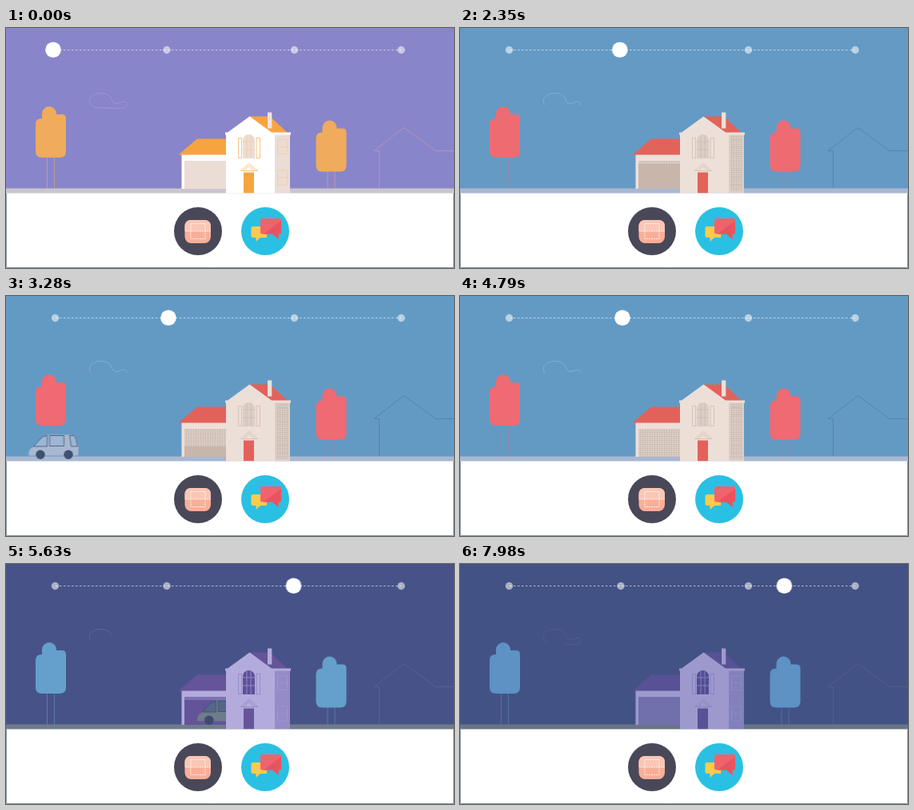
An HTML page for the animation above (8 s loop, 560x300 px).

```html
<!DOCTYPE html>
<html lang="en">
<head>
<meta charset="utf-8">
<title>House through the day</title>
<style>
  @property --sky { syntax: '<color>'; inherits: true; initial-value: #8985ca; }
  @property --tree { syntax: '<color>'; inherits: true; initial-value: #f0ab5c; }
  @property --trunk { syntax: '<color>'; inherits: true; initial-value: #cfa094; }
  @property --ground { syntax: '<color>'; inherits: true; initial-value: #c9c6cf; }
  @property --wall { syntax: '<color>'; inherits: true; initial-value: #fff; }
  @property --side { syntax: '<color>'; inherits: true; initial-value: #ecdcd6; }
  @property --shutter { syntax: '<color>'; inherits: true; initial-value: #ecdcd6; }
  @property --inside { syntax: '<color>'; inherits: true; initial-value: #cdbbb4; }
  @property --roof { syntax: '<color>'; inherits: true; initial-value: #f7a440; }
  @property --chimney { syntax: '<color>'; inherits: true; initial-value: #f0e4e2; }
  @property --glass { syntax: '<color>'; inherits: true; initial-value: #ecdcd6; }
  @property --line { syntax: '<color>'; inherits: true; initial-value: #f1cd9b; }
  @property --trim { syntax: '<color>'; inherits: true; initial-value: #f3b566; }
  @property --far { syntax: '<color>'; inherits: true; initial-value: #bb9bac; }
  @property --cloud { syntax: '<color>'; inherits: true; initial-value: #a09cd8; }
  @property --car { syntax: '<color>'; inherits: true; initial-value: #a9b8d2; }
  @property --pane { syntax: '<color>'; inherits: true; initial-value: #9db6d3; }
  @property --tyre { syntax: '<color>'; inherits: true; initial-value: #3f5170; }

  html, body { margin: 0; width: 100%; height: 100%; overflow: hidden; }
  svg { display: block; width: 560px; height: 300px; animation: theme 8s ease infinite; }

  .sky { fill: var(--sky); }
  .tree { fill: var(--tree); }
  .ground { fill: var(--ground); }
  .wall { fill: var(--wall); }
  .side { fill: var(--side); }
  .shutter { fill: var(--shutter); }
  .inside { fill: var(--inside); }
  .roof { fill: var(--roof); }
  .chimney { fill: var(--chimney); }
  .glass { fill: var(--glass); }
  .body { fill: var(--car); }
  .pane { fill: var(--pane); stroke: var(--tyre); stroke-width: .8; }
  .tyre { fill: var(--tyre); }
  .trunk, .line, .trim, .far, .cloud { fill: none; stroke-width: .8; }
  .trunk { stroke: var(--trunk); }
  .line { stroke: var(--line); }
  .trim { stroke: var(--trim); }
  .far { stroke: var(--far); }
  .cloud { stroke: var(--cloud); animation: cloud 8s ease infinite; }
  .hatch { fill: url(#hatch); animation: hatch 8s ease infinite; }
  .marker { fill: #fff; animation: marker 8s ease infinite; }
  .door { animation: door 8s linear infinite; }
  .drive { animation: drive 8s linear infinite; }
  .kerb { animation: kerb 8s linear infinite; }

  @keyframes theme {
    0%, 24.3% {
      --sky: #8985ca; --tree: #f0ab5c; --trunk: #cfa094; --ground: #c9c6cf;
      --wall: #fff; --side: #ecdcd6; --shutter: #ecdcd6; --inside: #cdbbb4;
      --roof: #f7a440; --chimney: #f0e4e2; --glass: #ecdcd6; --line: #f1cd9b;
      --trim: #f3b566; --far: #bb9bac; --cloud: #a09cd8;
      --car: #a9b8d2; --pane: #9db6d3; --tyre: #3f5170;
    }
    30.6%, 63.4% {
      --sky: #639ac4; --tree: #ef6a72; --trunk: #9488aa; --ground: #a9b8d2;
      --wall: #ecdfd8; --side: #ded1c9; --shutter: #ded1c9; --inside: #c9b6aa;
      --roof: #e2625b; --chimney: #ecdfd8; --glass: #dccdc5; --line: #c9bab1;
      --trim: #d6b9b0; --far: #4b7fab; --cloud: #8ab7d6;
      --car: #a9b8d2; --pane: #9db6d3; --tyre: #3f5170;
    }
    69.7%, 98.3% {
      --sky: #475388; --tree: #64a0cb; --trunk: #5f83b6; --ground: #6e7c8a;
      --wall: #b3abdb; --side: #958bc6; --shutter: #7b73b3; --inside: #63549a;
      --roof: #65549a; --chimney: #b3abdb; --glass: #5f509a; --line: #9f98d0;
      --trim: #8d84c2; --far: #5b6496; --cloud: #626d9e;
      --car: #6d7b8c; --pane: #56688a; --tyre: #3b4a6e;
    }
    99.75%, 100% {
      --sky: #435284; --tree: #5e92c4; --trunk: #5578ae; --ground: #687486;
      --wall: #9e99cd; --side: #8380bb; --shutter: #7270ac; --inside: #5d5496;
      --roof: #585195; --chimney: #9e99cd; --glass: #524d94; --line: #8c8fc8;
      --trim: #7f7ebf; --far: #58638f; --cloud: #56618f;
      --car: #6d7b8c; --pane: #56688a; --tyre: #3b4a6e;
    }
  }
  @keyframes cloud {
    0%, 24.3% { stroke-dasharray: 0 0 100 100; }
    30.6%, 63.4% { stroke-dasharray: 0 6 58 100; }
    69.7%, 98.3% { stroke-dasharray: 0 6 36 100; }
    99.75%, 100% { stroke-dasharray: 0 2 80 100; }
  }
  @keyframes hatch {
    0%, 24.3% { opacity: 0; }
    30.6%, 63.4% { opacity: 1; }
    69.7%, 100% { opacity: 0; }
  }
  @keyframes marker {
    0%, 24.3% { transform: translateX(59px); }
    30.6%, 63.4% { transform: translateX(203px); }
    69.7%, 98.3% { transform: translateX(359.5px); animation-timing-function: linear; }
    99.75% { transform: translateX(405px); animation-timing-function: linear; }
    100% { transform: translateX(412px); }
  }
  @keyframes door {
    0%, 25% { transform: none; }
    30%, 36.75% { transform: translateY(-35px); }
    43.6%, 63.6% { transform: none; }
    68.5% { transform: translateY(-35px); }
    69.9% { transform: translateY(-35px); animation-timing-function: cubic-bezier(.39, .575, .565, 1); }
    77.1%, 100% { transform: none; }
  }
  /* quadratic pull away, quadratic slow down on return */
  @keyframes drive {
    0% { transform: translateX(275px); }
    28.17% { transform: translateX(275px); animation-timing-function: cubic-bezier(.333, 0, .667, .333); }
    43.24% { transform: translateX(-66px); }
    63.63% { transform: translateX(-66px); animation-timing-function: cubic-bezier(.333, .667, .667, 1); }
    73.69%, 100% { transform: translateX(275px); }
  }
  @keyframes kerb {
    0%, 35.3% { transform: none; }
    38%, 65.5% { transform: translateY(3px); }
    68.5%, 100% { transform: none; }
  }
</style>
</head>
<body>
<svg viewBox="0 0 560 300">
  <defs>
    <pattern id="hatch" width="3" height="2.5" patternUnits="userSpaceOnUse">
      <path d="M0 .4H3M.4 0V2.5" fill="none" stroke="#c8b8ae" stroke-width=".7"/>
    </pattern>
    <clipPath id="opening"><rect x="223" y="166.5" width="52" height="34.5"/></clipPath>
    <g id="tree">
      <path class="trunk" d="M51.5 160V210M60.5 160V210"/>
      <path class="tree" d="M37 120q0-7 8-7v-6a9 9 0 0 1 18 0v1h7q5 0 5 5v41q0 8-8 8h-22q-8 0-8-8z"/>
    </g>
    <g id="sideWindow">
      <path class="line" d="M339.5 139.5h12v18h-12zM339.5 148.5h12"/>
    </g>
  </defs>

  <rect class="sky" width="560" height="210"/>

  <!-- timeline -->
  <path d="M62 27.5H494" stroke="#fff" stroke-opacity=".6" stroke-dasharray="2.5 2.5"/>
  <g fill="#fff" fill-opacity=".55">
    <circle cx="61.5" cy="27.5" r="4.7"/>
    <circle cx="201" cy="27.5" r="4.7"/>
    <circle cx="360.5" cy="27.5" r="4.7"/>
    <circle cx="494" cy="27.5" r="4.7"/>
  </g>
  <circle class="marker" cy="27.3" r="9.8"/>

  <!-- backdrop -->
  <path class="cloud" pathLength="100" d="M112 99.5C105 98 103 92 105 88C109 80 126 79 131 87Q133 91 133 92Q137 96 141 94T148 92Q153 94 150 98Q148 100.500 144 100.500L112 99.500"/>
  <path class="far" d="M466.500 201V153.500H460L497.500 124.500L537 153.500H560"/>
  <use href="#tree"/>
  <use href="#tree" x="350.5" y="17.5"/>
  <rect class="ground" y="200.5" width="560" height="7"/>

  <!-- garage -->
  <path class="wall" d="M219.500 157H276V201H219.500z"/>
  <path class="roof" d="M215.500 158.500L239 138.500H276V158.500z"/>
  <rect class="inside" x="223" y="166.5" width="52" height="34.5"/>
  <g clip-path="url(#opening)">
    <g class="door">
      <rect class="shutter" x="223" y="166.5" width="52" height="34.5"/>
      <rect class="hatch" x="223" y="166.5" width="52" height="34.5"/>
    </g>
  </g>

  <!-- car -->
  <g class="drive">
    <g class="kerb">
      <path class="body" d="M1 196Q0 189 6 186L17 174Q20 171 25 170.500H54Q58 170.500 60 174L63 185V194Q63 196.500 60 196.500H3Q1 196.500 1 196z"/>
      <path class="pane" d="M7 185L16 175Q19 172 24 171.500V185zM27 171.500H45V184.500H27zM52 171.500H57Q59 172 60 176L62 185H54z"/>
      <circle class="tyre" cx="15.5" cy="195.300" r="5.700"/>
      <circle class="tyre" cx="50.500" cy="195.300" r="5.700"/>
    </g>
  </g>

  <!-- house -->
  <path class="roof" d="M304 110.500H330L352 131H304z"/>
  <rect class="chimney" x="327" y="105.500" width="5.300" height="20"/>
  <rect class="side" x="335" y="132" width="20" height="74.500"/>
  <rect class="hatch" x="337" y="134" width="17" height="70"/>
  <path class="wall" d="M274 130.500H277L304.500 110.500L332 130.500H356V133.500H336V206.500H275V133.500H274z"/>
  <use href="#sideWindow"/>
  <use href="#sideWindow" y="38.500"/>
  <path class="glass" d="M296 163V140.500a7.500 7.500 0 0 1 15 0V163z"/>
  <path class="line" d="M301 134V163M306 134V163M296 142H311M296 152H311"/>
  <path class="trim" d="M290.500 137.500h4v25h-4zM313 137.500h4.500v25h-4.500z"/>
  <path class="trim" d="M293.500 178.500L304 169.500L314.500 178.500zM297 178.500L304 172.500L311 178.500"/>
  <rect class="roof" x="297" y="180.500" width="13" height="26"/>

  <!-- lower panel -->
  <rect y="206.500" width="560" height="94" fill="#fff"/>
  <path d="M.5 206.500V299.500H559.500V206.500" fill="none" stroke="#8a959f"/>
  <circle cx="240" cy="254" r="30" fill="#484859"/>
  <rect x="223.500" y="240" width="32.500" height="29" rx="8" fill="#f9ae98"/>
  <path d="M223.500 254V248q0-8 8-8h16.500q8 0 8 8V254z" fill="#fac6b5"/>
  <path d="M231 244.500H249V263.500H231zM224 254H256" fill="none" stroke="#fff" stroke-width=".8" stroke-dasharray="2 1"/>
  <circle cx="324" cy="254" r="30" fill="#2ac0e3"/>
  <path d="M308.500 248H326V262H318L312.500 267V262H308.500Q306.500 262 306.500 260V250Q306.500 248 308.500 248z" fill="#fbcb4f"/>
  <path d="M320.500 238H341.500Q344 238 344 240.500V255Q344 257.500 341.500 257.500H340.500V264L333 257.500H320.500Q318 257.500 318 255V240.500Q318 238 320.500 238z" fill="#f0636c"/>
  <path d="M344 241V255Q344 257.500 341.500 257.500H340.500V264L333 257.500H322z" fill="#e65461"/>
</svg>
</body>
</html>
```
